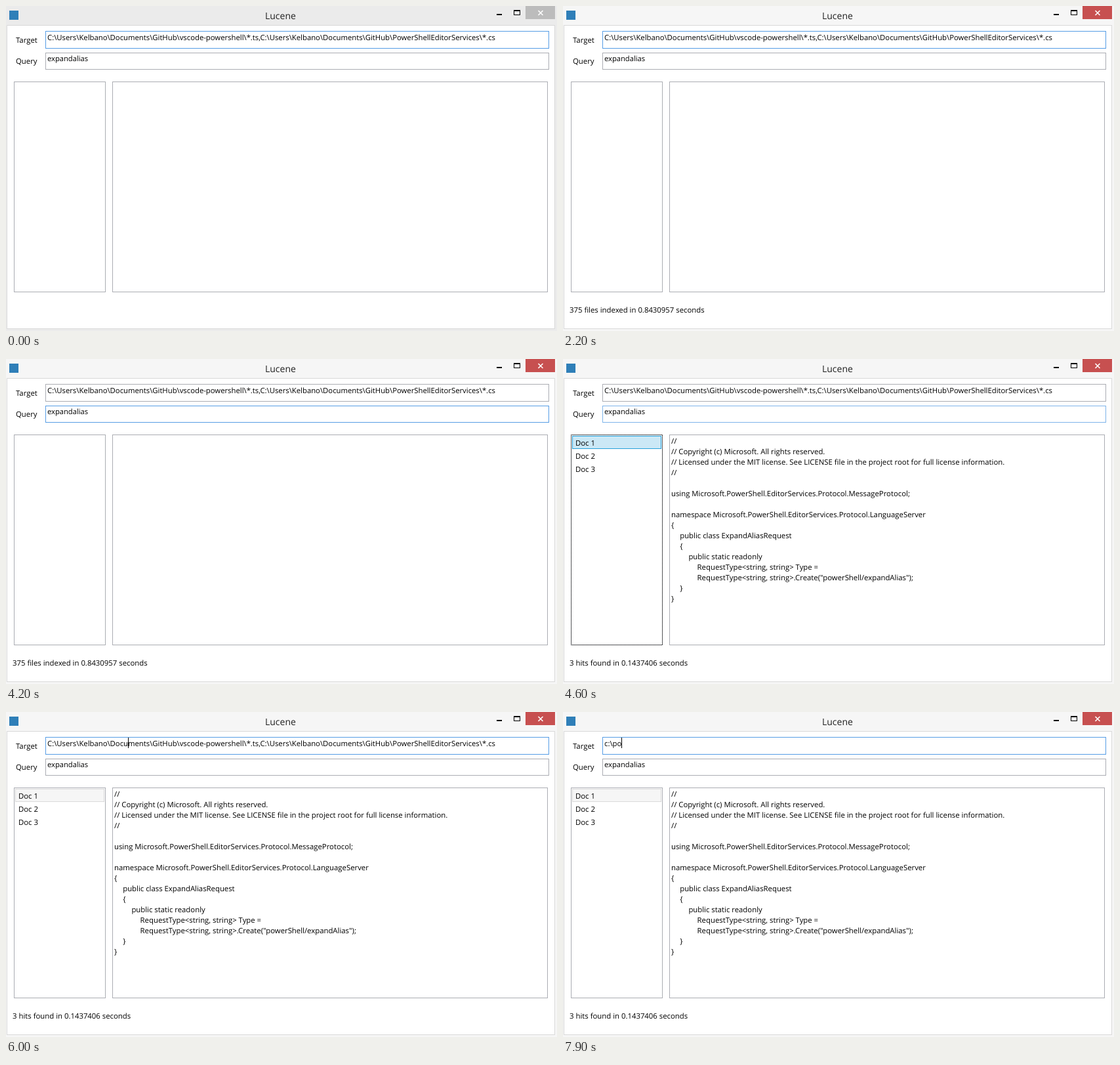
An HTML page for the animation above (8 s loop, 840 by 495 pixels).

```html
<!DOCTYPE html>
<html lang="en">
<head>
<meta charset="utf-8">
<title>Lucene</title>
<style>
  html, body { margin: 0; width: 100%; height: 100%; overflow: hidden; }
  svg { display: block; }
  text { font: 11.35px "Open Sans", "Noto Sans", sans-serif; text-rendering: geometricPrecision; }
  #title { font-size: 14px; fill: #222; }
  .box { fill: #fff; }
</style>
</head>
<body>
<svg width="840" height="495" viewBox="0 0 840 495">
  <rect id="frame" width="840" height="495"/>
  <rect x="1.5" y="29.5" width="835" height="462" fill="#fff" stroke="#d9d9d9"/>
  <rect x="5" y="7" width="14" height="14" fill="#2f7fb8"/>
  <text id="title" x="395" y="20">Lucene</text>

  <rect x="748" y="12" width="8" height="2"/>
  <path d="M774 6h10v8h-10zM775 8v5h8v-5z" fill-rule="evenodd"/>
  <rect id="close" x="792" width="45" height="20"/>
  <path d="M811.5 7l7 7m0-7l-7 7" stroke="#fff" stroke-width="1.6"/>

  <text x="15" y="56">Target</text>
  <text x="15" y="88">Query</text>
  <rect id="targetBox" class="box" x="60.5" y="38.5" width="767" height="26"/>
  <rect id="queryBox" class="box" x="60.5" y="71.5" width="767" height="25"/>
  <text id="target" x="63" y="52" style="font-size:11.3px"></text>
  <text x="63" y="84" style="font-size:11.2px">expandalias</text>
  <rect id="selection" y="39" height="17" fill="#39f" opacity=".4"/>
  <rect id="caret" width="1" height="16"/>

  <rect class="box" x="12.5" y="115.5" width="139" height="320" stroke="#abadb3"/>
  <rect id="listFocus" x="12.5" y="115.5" width="139" height="320" fill="none" stroke="#000"
    stroke-dasharray="1" stroke-dashoffset=".5"/>
  <rect id="docBox" class="box" x="162.5" y="115.5" width="663" height="320"/>
  <g id="results">
    <rect id="item" x="14.5" y="117.5" width="135" height="19"/>
  </g>
  <text id="status" x="10" y="467"></text>
</svg>
<script>
const $ = id => document.getElementById(id);
const set = (id, attrs) => {
  for (const name in attrs) $(id).setAttribute(name, attrs[name]);
};
const show = (id, visible) => set(id, { visibility: visible ? "visible" : "hidden" });

function addText(x, y, content) {
  const node = document.createElementNS("http://www.w3.org/2000/svg", "text");
  node.setAttribute("x", x);
  node.setAttribute("y", y);
  node.textContent = content;
  $("results").append(node);
}

const code = `//
// Copyright (c) Microsoft. All rights reserved.
// Licensed under the MIT license. See LICENSE file in the project root for full license information.
//

using Microsoft.PowerShell.EditorServices.Protocol.MessageProtocol;

namespace Microsoft.PowerShell.EditorServices.Protocol.LanguageServer
{
    public class ExpandAliasRequest
    {
        public static readonly
            RequestType<string, string> Type =
            RequestType<string, string>.Create("powerShell/expandAlias");
    }
}`;
code.split("\n").forEach((line, i) =>
  addText(165 + 3.3 * line.search(/\S|$/), 129 + 16 * i, line.trim()));
for (let i = 0; i < 3; i++) addText(19, 132 + 20 * i, "Doc " + (i + 1));

const root = String.raw`C:\Users\Kelbano\Documents\GitHub`;
const paths = root + String.raw`\vscode-powershell\*.ts,` + root + String.raw`\PowerShellEditorServices\*.cs`;
const NORMAL = "#abadb3", HOVER = "#7eb4ea", FOCUS = "#569de5";

// Each track lists [start time in ms, value]; a value holds until the next one.
const tracks = {
  active: [[0, false], [400, true]],
  target: [[0, paths], [7200, "c"], [7400, "c:"], [7600, "c:\\"], [7700, "c:\\p"], [7900, "c:\\po"]],
  caret: [[0, 0], [400, 746], [900, 0], [1400, 746], [2200, 0], [2300, 746], [2800, 0],
    [3300, 746], [3600, 124], [4200, 0], [6000, 186], [6600, 0],
    [7200, 68], [7400, 71], [7600, 75], [7700, 82], [7900, 89]],
  selection: [[0, [63, 0]], [6800, [159, 60]], [6900, [63, 683]], [7200, [63, 0]]],
  targetBox: [[0, FOCUS], [3600, NORMAL], [5800, HOVER], [6000, FOCUS]],
  queryBox: [[0, NORMAL], [3000, HOVER], [3600, FOCUS], [4600, HOVER], [5700, NORMAL]],
  docBox: [[0, NORMAL], [2400, HOVER], [2900, NORMAL]],
  results: [[0, false], [4600, true]],
  listFocus: [[0, false], [4600, true], [6000, false]],
  status: [[0, ""], [1400, "Indexing..."], [2200, "375 files indexed in 0.8430957 seconds"],
    [4600, "3 hits found in 0.1437406 seconds"]],
};

function draw(time) {
  const now = {};
  for (const name in tracks) now[name] = tracks[name].findLast(([start]) => start <= time)[1];

  set("frame", { fill: now.active ? "#f6f6f6" : "#ebebeb" });
  set("close", { fill: now.active ? "#c75050" : "#bcbcbc" });
  for (const id of ["targetBox", "queryBox", "docBox"]) set(id, { stroke: now[id] });
  for (const id of ["target", "status"]) $(id).textContent = now[id];
  for (const id of ["results", "listFocus", "caret"]) show(id, now[id]);
  set("caret", { x: now.caret, y: now.caret === 124 ? 72 : 39 });
  set("selection", { x: now.selection[0], width: now.selection[1] });
  set("item", now.listFocus ? { fill: "#cbe8f6", stroke: "#26a0da" } : { fill: "#f6f6f6", stroke: "#dadada" });
}

const begin = performance.now();
function tick() {
  draw((performance.now() - begin) % 8000);
  requestAnimationFrame(tick);
}
tick();
</script>
</body>
</html>
```
